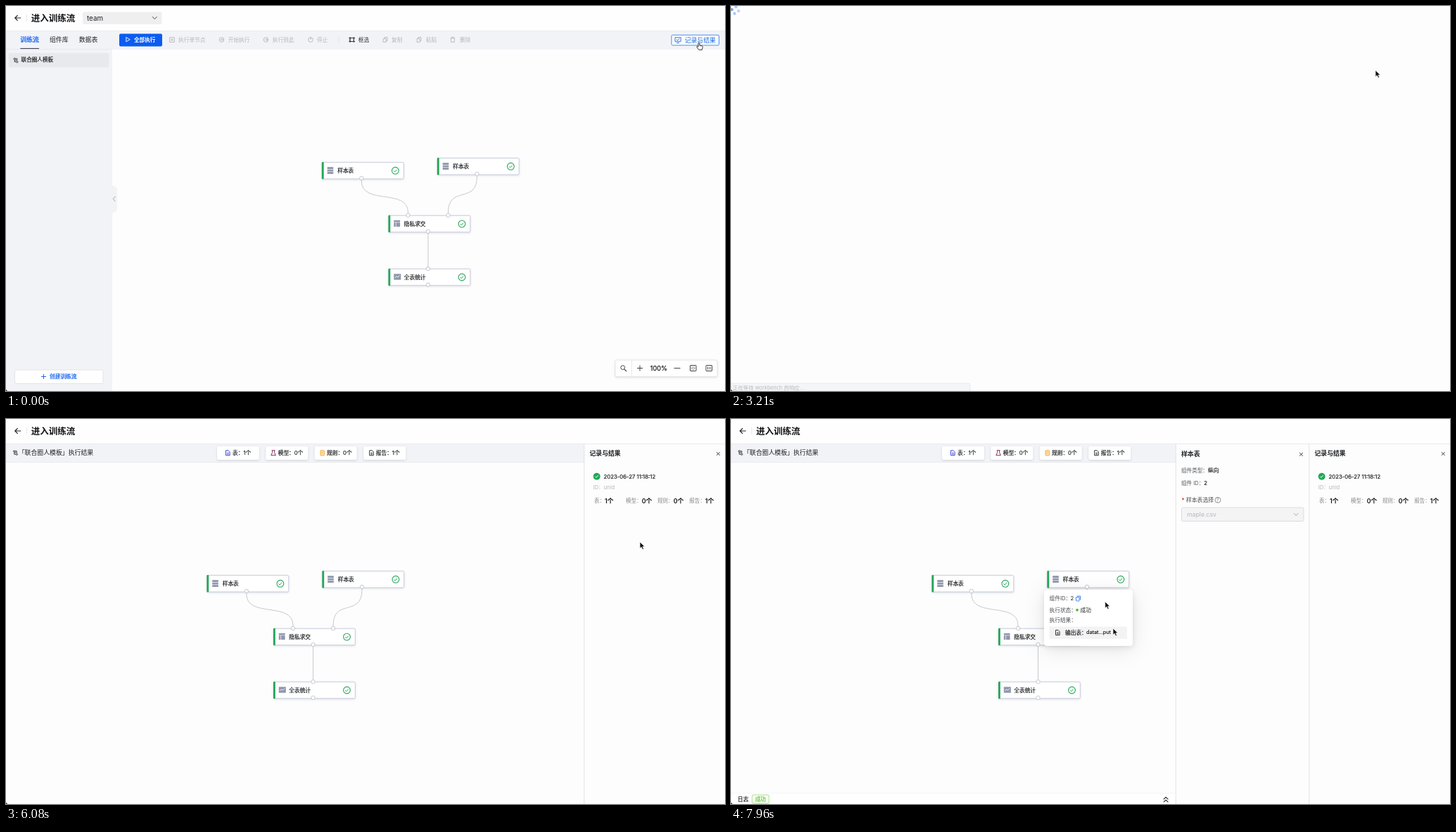
An HTML page that plays this animation: 1022 px wide and 548 px high, repeating every 8000 ms.

```html
<!DOCTYPE html>
<html lang="zh-CN">
<head>
<meta charset="utf-8">
<style>
html, body { margin: 0; width: 100%; height: 100%; overflow: hidden; background: #fdfdfd; }
svg { display: block; width: 100vw; height: 100vh; }
text { font-family: Inter, "Noto Sans CJK SC", "Noto Sans CJK", sans-serif; white-space: pre; }
.soft { filter: drop-shadow(0 1px 1.5px rgba(40, 50, 80, .16)); }
.pop { filter: drop-shadow(0 2px 4px rgba(0, 0, 0, .1)) drop-shadow(0 5px 14px rgba(0, 0, 0, .1)); }
</style>
</head>
<body>
<svg id="stage" viewBox="0 0 1022 548"></svg>
<script>
const LOOP = 8000;
const DARK = '#1f2125', GRAY = '#85878c', PALE = '#b5b7bc', BLUE = '#0b5cf0', GREEN = '#23a757', BAR = '#f2f3f7';

// Drawing helpers; weight 500 is regular type with a hairline outline
const text = (x, y, s, size = 7.7, fill = DARK, weight = 400) =>
  `<text x="${x}" y="${y}" font-size="${size}" fill="${fill}" ` +
  (weight === 500 ? `stroke="${fill}" stroke-width="${size * .028}"` : `font-weight="${weight}"`) + `>${s}</text>`;
const rect = (x, y, w, h, fill, r = 0, stroke = 'none', extra = '') =>
  `<rect x="${x}" y="${y}" width="${w}" height="${h}" rx="${r}" fill="${fill}" stroke="${stroke}" ${extra}/>`;
const line = (d, stroke = DARK, w = 1, extra = '') =>
  `<path d="${d}" fill="none" stroke="${stroke}" stroke-width="${w}" ${extra}/>`;
const circle = (x, y, r, fill = 'none', stroke = 'none', w = 1) =>
  `<circle cx="${x}" cy="${y}" r="${r}" fill="${fill}" stroke="${stroke}" stroke-width="${w}"/>`;
const group = (id, body, extra = '') => `<g id="${id}" ${extra}>${body}</g>`;
const at = (x, y, body) => `<g transform="translate(${x} ${y})">${body}</g>`;
const tick = (x, y, c) => line(`M${x - 2.2} ${y}l1.6 1.7 3-3.3`, c);
const cross = (x, y) => line(`M${x - 2.3} ${y - 2.3}l4.6 4.6m0-4.6l-4.6 4.6`, '#333', 1);
const copyIcon = (x, y, c) =>
  line(`M${x - 1.5} ${y - 3.5}h4.5v5.5`, c, .9) + rect(x - 3, y - 2, 4.5, 5.5, 'none', .5, c, 'stroke-width=".9"');
const docIcon = (x, y, c) =>
  line(`M${x - 2.8} ${y - 3.5}h3.6l2 2v5h-5.6zM${x - 1.2} ${y}h2.6M${x - 1.2} ${y + 1.8}h2.6`, c, 1);
const flowIcon = (x, y) =>
  circle(x - 1.8, y - 2, 1.2, 'none', '#333', .9) + circle(x + 1.8, y + 2.2, 1.2, 'none', '#333', .9) +
  line(`M${x - .6} ${y - 2.4}h2.4v2.2h-3.6v2.4h2.2`, '#333', .9);

// Flow graph
const ICONS = {
  table: [0, 3.5, 7].map(y => rect(0, y, 8.6, 2.8, '#8f97ab')).join(''),
  join: rect(0, 0, 8.8, 2.6, '#8f97ab') + rect(0, 3.2, 2.6, 6, '#8f97ab') + rect(3.3, 3.2, 5.5, 6, '#8f97ab'),
  stat: rect(0, .4, 10, 8.4, '#8f97ab') + line('M1.5 6l2.2-2.3 2 1.6 2.6-2.8', '#fff', .9),
};
const node = (x, y, label, icon) => at(x, y,
  `<g class="soft">${rect(.5, .5, 116, 23.5, '#fff', 1.5, '#bfc4d9', 'stroke-width=".8"')}</g>` +
  rect(.2, 0, 2.8, 24.5, GREEN, 1) + at(8, 7.2, ICONS[icon]) + text(22.5, 15, label, 7.7, DARK, 500) +
  circle(104.7, 12.3, 4.9, 'none', GREEN, 1.1) + tick(104.5, 12.4, GREEN));
// Short straight ends with an S curve between them
const edge = (x1, y1, x2, y2) => {
  const pull = 4 + (y2 - y1) * 2 / 3;
  return line(`M${x1} ${y1}v4C${x1} ${y1 + pull} ${x2} ${y2 - pull} ${x2} ${y2 - 4}v4`, '#c1c3c7', .9);
};
const PORTS = [[505.3, 245], [669.5, 239], [571.5, 298], [628.5, 298], [600, 321], [600, 374], [600, 396.7]];
const graph =
  edge(505.3, 245, 571.5, 298) + edge(669.5, 239, 628.5, 298) + line('M600 321V374', '#c1c3c7', .9) +
  node(448.7, 222, '样本表', 'table') + node(612.7, 216, '样本表', 'table') +
  node(543.3, 297.8, '隐私求交', 'join') + node(543.3, 373.7, '全表统计', 'stat') +
  PORTS.map(([x, y]) => circle(x, y, 2.7, '#fff', '#b9bbc0', .8)).join('');

const header = rect(0, 0, 1022, 35, '#fefefe') +
  line('M21.2 17H13M16.6 13.1L12.8 17l3.8 3.9', DARK, 1.2) + line('M29.5 12V22', '#e2e2e2', .8) +
  text(35.7, 22, '进入训练流', 12.5, '#111215', 600);

// Editor page
const tool = (x, label, icon, c = PALE) => line(icon, c, .9) + text(x, 51, label, 7.7, c);
const dial = (x, inner) => `M${x - 3.3} 48a3.3 3.3 0 1 0 6.6 0a3.3 3.3 0 1 0 -6.6 0${inner}`;
const sheet = x => `M${x - 2.8} 46.5h4v5h-4zM${x - 1} 46.3v-1.8h4v5h-1.6`;
const toolbar = rect(0, 35, 1022, 27, BAR) + line('M0 35.3H1022', '#e6e7ec', .6) +
  rect(161, 39.5, 61, 18, BLUE, 2) + line('M170.8 44.5v6.4l5.4-3.2z', '#fff', .9) +
  text(182, 51, '全部执行', 7.6, '#fff', 600) +
  tool(245, '执行单节点', 'M232.7 44.8h6.6v6.6h-6.6zM236 46.4v3.4M234.3 48.1h3.4') +
  tool(315.7, '开始执行', dial(306.5, 'm1.5 0h3.8m-1.6-1.6l1.6 1.6-1.6 1.6')) +
  tool(378.7, '执行到此', dial(369.5, 'm2 0h3.6m-1.6-1.6l1.6 1.6-1.6 1.6')) +
  tool(442, '停止', dial(433, 'm3.3-4v4')) + line('M473 44V52', '#dcdde2', .8) +
  tool(500.7, '框选', 'M489 45.5h5.4v5h-5.4zM487.3 45.5h8.8M487.3 50.5h8.8M489 44v8M494.4 44v8', '#2f3238') +
  tool(548, '复制', sheet(539)) + tool(597, '粘贴', sheet(587)) +
  tool(645, '删除', 'M631.7 45.8h6.6M633.6 45.6v-1.3h2.8v1.3M632.6 46v5.4h4.8v-5.4');
const recordButton = rect(946, 41.3, 67.5, 14.6, '#fff', 1.5, '#3784e8', 'stroke-width=".9"') +
  line('M951 44.8h8.2v5.6h-8.2zM953 52.5h4.2M952.8 47.4l1.7 1.5 3-2.6', '#1769e0', .9) +
  text(964.7, 51.8, '记录与结果', 8.85, '#1769e0');
const sidebar = rect(0, 62, 151, 486, BAR) +
  text(20.3, 51.2, '训练流', 8.9, BLUE, 500) + text(62, 51.2, '组件库', 8.9) + text(103.7, 51.2, '数据表', 8.9) +
  line('M0 61.5H151', '#e4e5ea', .7) + line('M20.3 60.5H47', '#3c4352', 1.1) +
  rect(4, 67, 142.5, 20.5, '#e8e9ed', 3) + flowIcon(14, 77.3) + text(21.6, 79.3, '联合圈人模板', 7.6, DARK, 500) +
  rect(12.5, 518, 125.5, 19.5, '#fff', 2, '#dcdde3', 'stroke-width=".8"') +
  line('M50 527.5h7M53.5 524v7', BLUE, .9) + text(62, 530.4, '创建训练流', 7.7, BLUE, 500) +
  `<path d="M151 255l7 4v32l-7 4z" fill="${BAR}"/>` + line('M155.3 271l-3 3.6 3 3.6', '#9a9ca3', .9);
const zoomBar = `<g class="soft">${rect(866, 504, 145, 23.5, '#fff', 2, '#e3e3e6', 'stroke-width=".8"')}</g>` +
  circle(876.7, 514.6, 2.9, 'none', '#444') + line('M878.8 516.8l3.2 3.2', '#444', 1.2) +
  line('M889.5 504V527.5', '#e3e3e6', .8) + line('M897 515.5h8M901 511.5v8M949.5 515.5h9', '#444') +
  text(915.8, 519, '100%', 9.1, DARK, 500) +
  rect(972.5, 511.5, 8.5, 8, 'none', .5, '#444') + line('M976.7 513v1.7m0 1.7v1.7M974 515.5h1.7m2 0h1.7', '#444', .8) +
  rect(995, 511.5, 8.5, 8, 'none', .5, '#444') + line('M997.5 513.5v4M1001 513.5v4M999.3 514.3v.8m0 1v.8', '#444', .9);
const editor = group('editor',
  rect(0, 0, 1022, 548, '#fdfdfd') + graph + header +
  rect(109, 8.5, 112.5, 17.5, '#efeff0', 2) + text(115, 20.6, 'team', 9.8) +
  line('M208 15.2l3.3 3.4 3.3-3.4', '#444') +
  toolbar + group('recordButton', recordButton) + sidebar + group('zoomBar', zoomBar));

// Result page
const chip = (x, labelX, label, icon) =>
  `<g class="soft">${rect(x, 39, 60, 19, '#fff', 2)}</g>` + icon + text(labelX, 51, label, 7.7, DARK, 500);
const result = group('result',
  rect(0, 0, 1022, 548, '#fdfdfd') + group('resultGraph', graph, 'transform="translate(-163.5 0)"') + header +
  rect(0, 35, 1022, 27, BAR) + line('M0 35.3H1022M0 61.7H822', '#e4e5ea', .6) +
  flowIcon(13.5, 48) + text(17.7, 51.4, '「联合圈人模板」执行结果', 8.9) +
  chip(300, 322, '表：1个', docIcon(315.3, 48.3, '#3d45e0')) +
  chip(369.3, 386.7, '模型：0个', line('M377.7 44.7h4.8M378.6 44.7v3l-1.8 4h6.6l-1.8-4v-3', '#8a2f63', 1)) +
  chip(438.7, 456, '规则：0个', rect(447, 44.8, 5.4, 7, '#ffe9c9', .5, '#f5a42c') + line('M448.3 47h2.6M448.3 49h2.6', '#f5a42c', .8)) +
  chip(508.3, 525.8, '报告：1个', docIcon(519.5, 48.3, '#333')));

const popover = group('popover', `<g class="pop">${rect(445, 243, 126, 80, '#fff', 4)}</g>` +
  text(452.5, 258.2, '组件ID：', 7.7, '#4a4d53') + text(482.5, 258.2, '2', 7.7) + copyIcon(493.5, 255.5, '#2c7be5') +
  text(452.5, 274.7, '执行状态：', 7.7, '#4a4d53') + circle(492, 271.8, 1.9, '#52b52a') + text(496.5, 274.7, '成功') +
  text(452.5, 289, '执行结果：', 7.7, '#4a4d53') + rect(452.5, 295.5, 110.5, 17.5, '#f3f3f4', 1) +
  docIcon(464.3, 304, '#333') + text(475, 306.5, '输出表：', 7.7, DARK, 500) + text(505, 306.3, 'datat...put', 7.3, DARK, 500));

const logBar = group('logBar', rect(0, 533, 632, 15, '#fff') + line('M0 532.7H632', '#eeeeef', .6) +
  text(9.5, 543.8, '日志', 7.7, DARK, 500) +
  rect(30, 535, 24, 12.2, '#f4ffec', 2, '#a9dd82', 'stroke-width=".9"') + text(34.5, 543.9, '成功', 7.6, '#48a51c') +
  line('M614.8 541.3l3.3-3 3.3 3M614.8 545.3l3.3-3 3.3 3', '#222', 1.1));

const config = group('config', rect(632, 36, 191, 512, '#fdfdfd') + line('M632.3 36V548', '#dcdcdf', .8) +
  text(640, 53.3, '样本表', 8.9, DARK, 600) + cross(810.5, 50.3) +
  text(640, 76.3, '组件类型：', 7.6, '#55585d') + text(678, 76.3, '纵向', 7.7, DARK, 500) +
  text(640, 94, '组件 ID：', 7.6, '#55585d') + text(672.3, 94, '2', 7.7, DARK, 500) +
  text(640.3, 119, '*', 8.5, '#ee3b3b', 600) + text(647, 118, '样本表选择', 7.8, '#4a4d53') +
  circle(692, 115.3, 4, 'none', '#77797e', .8) + text(689.9, 118, '?', 7, '#77797e') +
  rect(640.5, 126, 173.5, 19.5, '#f4f4f5', 2, '#d5d6da', 'stroke-width=".8"') +
  text(648, 139, 'maple.csv', 8.7, PALE) + line('M800 134l3.2 3.4 3.2-3.4', '#aaa'));

// Record list, shared by both pages
const count = (x, label, nx, n) => text(x, 119.2, label, 7.5, GRAY) + text(nx, 119.8, n + '个', 8.8, '#111215', 600);
const records = group('records', rect(822, 36, 200, 512, '#fdfdfd') + line('M821.8 36V548', '#dcdcdf', .8) +
  group('cardHover', rect(822.2, 69, 200, 59.5, '#f2f2f3') + copyIcon(873, 97.5, '#a4a6ab')) +
  text(829.5, 52, '记录与结果', 8.85, DARK, 600) + cross(1012.3, 49.5) +
  circle(839.7, 81.7, 5, GREEN) + tick(839.5, 81.7, '#fff') +
  text(849.6, 85.3, '2023-06-27 11:18:12', 7.75, DARK, 500) +
  text(834.7, 100.3, 'ID：', 7.5, PALE) + text(849.6, 100.3, 'unid', 7.6, PALE) +
  count(836, '表：', 851, 1) + count(881, '模型：', 903.7, 0) +
  count(926, '规则：', 948.8, 0) + count(971.3, '报告：', 993.8, 1));

const blank = group('blank', rect(0, 0, 1022, 548, '#fdfdfd') +
  group('spinner', [.45, .6, .95, .55].map((o, i) =>
    `<circle cx="${6 + 4.8 * Math.cos(i * Math.PI / 2)}" cy="${6 + 4.8 * Math.sin(i * Math.PI / 2)}" r="2.1" fill="#6f9ff0" opacity="${o}"/>`).join('')) +
  group('status', rect(-3, 537, 343, 14, '#eff0f3', 2, '#d6d8dc', 'stroke-width=".8"') +
    text(2.5, 546.3, '正在等待 workbench 的响应…', 7.4, '#8d9096')));

const ARROW = '<path d="M0 0v9.3l2.2-2 1.6 3.5 1.7-.8-1.5-3.3h3z" fill="#111" stroke="#fff" stroke-width=".7"/>';
const HAND = '<path d="M-1 .8c0-1.3 1.9-1.3 1.9 0v3.3l3.3.8c.9.2 1.2.8 1 1.7l-.8 3.8h-4.6l-2.8-3.9c-.6-1 .5-1.7 1.2-1l.8.8z" fill="#fff" stroke="#222" stroke-width=".9"/>';
const cursors = group('ghost', at(531.7, 260, ARROW)) +
  group('cursor', group('arrow', ARROW) + group('hand', HAND));

document.getElementById('stage').innerHTML = editor + result + popover + logBar + config + records + blank +
  '<path d="M0 545.5V548H2.5Q.6 547.4 0 545.5z" fill="#333"/>' + cursors;

// Timeline
const parts = Object.fromEntries([...document.querySelectorAll('g[id]')].map(g => [g.id, g]));
const clamp = v => Math.max(0, Math.min(1, v));
const span = (t, a, b) => clamp((t - a) / (b - a));
const easeOut = p => 1 - (1 - p) ** 3;
const smooth = p => p * p * (3 - 2 * p);
const show = (id, on) => parts[id].setAttribute('display', on ? 'inline' : 'none');
const fade = (id, o) => { show(id, o > 0); parts[id].setAttribute('opacity', o); };
const move = (id, x, y = 0) => parts[id].setAttribute('transform', `translate(${x} ${y})`);

// Each move: start, end, target x, target y
const START = [985, 52];
const MOVES = [
  [1790, 2200, 916, 91.5], [4290, 4500, 630, 174], [4750, 5040, 500, 285], [5250, 5630, 430, 130],
  [5830, 6070, 901, 175], [6630, 6900, 522, 230], [7480, 7690, 531.7, 260], [7700, 7940, 543, 298],
];
function pointer(t) {
  let [x, y] = START;
  for (const [a, b, tx, ty] of MOVES) {
    const p = smooth(span(t, a, b));
    x += (tx - x) * p;
    y += (ty - y) * p;
  }
  return [x, y];
}

function draw(t) {
  const opened = t >= 3650, waiting = t >= 2880 && !opened;
  const [x, y] = pointer(t);
  const hand = t < 940 || (t > 6840 && t < 7480);

  show('editor', t < 2880);
  show('recordButton', t < 960);
  move('zoomBar', t < 960 ? 0 : -202);
  show('result', opened);
  show('resultGraph', t >= 3800);

  show('records', t >= 980);
  move('records', opened ? 0 : 201 * (1 - easeOut(span(t, 980, 1580))));
  show('cardHover', (t > 2050 && t < 2880) || (opened && t < 4370));

  show('blank', waiting);
  parts.spinner.setAttribute('transform', `rotate(${12 + (t - 3210) * .3} 6 6)`);
  fade('status', span(t, 2900, 2980) * (1 - span(t, 3130, 3330)));

  fade('popover', span(t, 6900, 7000));
  show('logBar', t >= 7360);
  show('config', t >= 7360);
  move('config', 191 * (1 - easeOut(span(t, 7360, 7760))));

  move('cursor', x, y);
  show('hand', hand);
  show('arrow', !hand);
  show('ghost', t >= 7700);
}

const begin = performance.now();
function loop() {
  draw((performance.now() - begin) % LOOP);
  requestAnimationFrame(loop);
}
loop();
</script>
</body>
</html>
```
